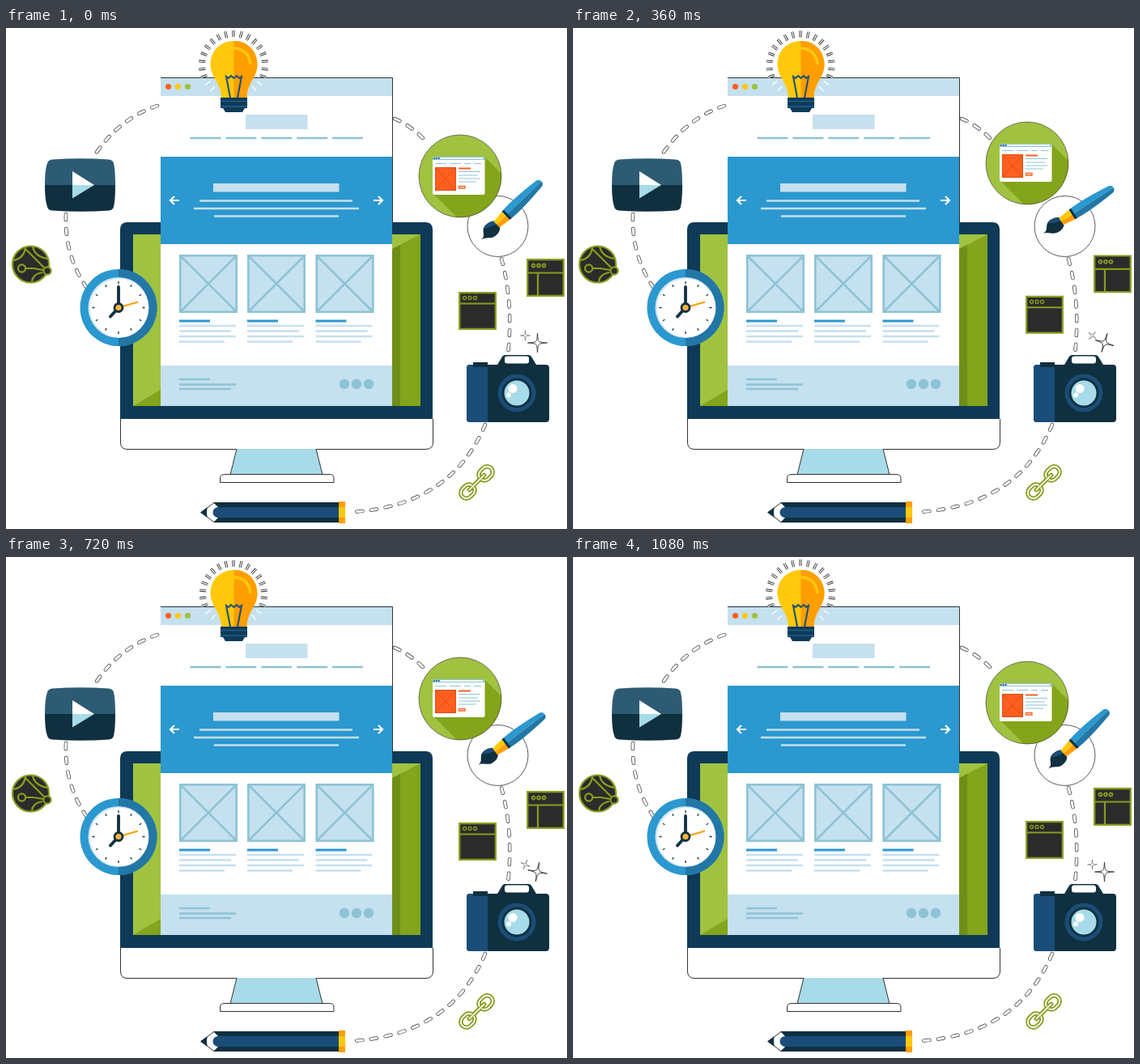
An HTML page for the animation above (1100 ms loop, 693 by 619 pixels).

```html
<!DOCTYPE html>
<html lang="en">
<head>
<meta charset="utf-8">
<title>Web design workspace</title>
<style>
html, body { margin: 0; width: 100%; height: 100%; overflow: hidden; background: #fff; }
svg { display: block; width: 693px; height: 619px; }
.line { fill: none; stroke: #333; }
.pale { fill: #c5e0ee; }
.paleLine { fill: none; stroke: #c5e0ee; stroke-width: 2.6; }
.tealLine { fill: none; stroke: #8cc3d5; stroke-width: 2.6; }
.navy { fill: #10303f; }
.deep { fill: #1a4d78; }
.blue { fill: #2b98cf; }
.sky { fill: #a7dbe9; }
.white { fill: #fff; }
.lime { fill: #a0c240; }
.moss { fill: #84a41b; }
.icon { fill: #2b2b2b; stroke: #869d1f; stroke-width: 2.2; }
.dash { fill: none; stroke-linecap: round; stroke-dasharray: 7 10.8; }
</style>
</head>
<body>
<svg viewBox="0 0 693 619">
<defs>
  <path id="trail" d="M187 96Q137 113 107 161M74 230Q72 280 99 320M480 112Q505 123 522 144M612 285Q627 340 620 403M592 490Q550 590 428 598"/>
  <g id="dots"><circle r="2"/><circle cx="6.5" r="2"/><circle cx="13" r="2"/></g>
  <path id="frame" d="M1.2 1.2H45.8V45.8H1.2Z"/>
  <g id="article">
    <path class="pale" d="M0 280h72v72H0Z"/>
    <path class="tealLine" d="M1.3 281.3H70.7V350.7H1.3ZL70.7 350.7M70.7 281.3L1.3 350.7"/>
    <path d="M0 362H38" stroke="#2b98cf" stroke-width="2.8"/>
    <path class="paleLine" d="M0 368H70M0 374.5H64M0 381H70M0 387.5H56"/>
  </g>
  <path id="star" d="M0-12Q.5-2 2-2Q2-.5 12 0Q2 .5 2 2Q.5 2 0 12Q-.5 2-2 2Q-2 .5-12 0Q-2-.5-2-2Q-.5-2 0-12Z"/>
  <path id="chain" d="M7-2.500A7 7 0 0 1 13-7H18A7 7 0 0 1 18 7H13A7 7 0 0 1 7 2.500M-7-2.500A7 7 0 0 0-13-7H-18A7 7 0 0 0-18 7H-13A7 7 0 0 0-7 2.500M-13 0H13"/>
  <path id="glass" d="M281.5 16C264 16 252.5 29 252.5 45C252.5 61 266 68 266 86H297.5C297.5 68 310.5 61 310.5 45C310.5 29 299 16 281.5 16Z"/>
  <path id="rays"/>
  <clipPath id="rightGlass"><path d="M281.5 0h40v100h-40Z"/></clipPath>
  <clipPath id="badge"><circle r="51"/></clipPath>
</defs>

<use href="#trail" class="dash" stroke="#333" stroke-width="4.4"/>
<use href="#trail" class="dash" stroke="#fff" stroke-width="3"/>

<!-- monitor -->
<path fill="#0f3a57" d="M141 483V249Q141 240 150 240H518Q527 240 527 249V483Z"/>
<path class="lime" d="M157 255H512V467H157Z"/>
<path class="moss" d="M157 467L191 447V467ZM477 273L512 255V467H477Z"/>
<path fill="#6f8e18" d="M477 273L487 268V467H477Z"/>
<path class="line" d="M141.5 483V512Q141.5 520.5 150 520.5H518Q527.5 520.5 527.5 512V483"/>
<path class="sky" d="M285 520H383L391 552H277Z"/>
<path class="line" d="M285 520L277 552M383 520L391 552M264.5 561.5V556Q265 551.5 270 551.5H399Q405 551.5 405 556V561.5Z"/>

<use href="#rays" stroke="#222" stroke-width="3"/>

<!-- web page -->
<path class="white" d="M191 62H477V467H191Z"/>
<path class="line" d="M191 61.5H477.5V240"/>
<path class="pale" d="M191 62H477V84H191ZM296 107H372.5V125H296ZM191 417H477V467H191Z"/>
<circle cx="200.5" cy="72.5" r="3.6" fill="#ff5f1f"/>
<circle cx="212.5" cy="72.5" r="3.6" fill="#ffc80b"/>
<circle cx="224.5" cy="72.5" r="3.6" class="lime"/>
<path class="tealLine" d="M227.5 136H441" stroke-dasharray="38 5.9"/>
<path class="blue" d="M191 159H477V267H191Z"/>
<path class="pale" d="M256 192H411.5V202.5H256Z"/>
<path class="paleLine" d="M239 213.5H428M232 223H436M257 232.5H411"/>
<path d="M214 213H204M208 208L203 213L208 218M454 213H464M460 208L465 213L460 218" fill="none" stroke="#fff" stroke-width="2.2"/>
<use href="#article" x="214"/><use href="#article" x="298"/><use href="#article" x="382.5"/>
<path class="tealLine" d="M214 434H252M214 440.5H284M214 446H278"/>
<g fill="#8cc3d5"><circle cx="418" cy="440" r="6.2"/><circle cx="433" cy="440" r="6.2"/><circle cx="448" cy="440" r="6.2"/></g>

<!-- light bulb -->
<use href="#rays" stroke="#fff" stroke-width="1.3"/>
<use href="#glass" fill="#ffc80b"/>
<use href="#glass" fill="#ff9e00" clip-path="url(#rightGlass)"/>
<path d="M281.5 25Q300 26 302 45" fill="none" stroke="#ffc80b" stroke-width="3.5"/>
<path d="M277 86L272 60L275 62L278 59L281.5 62L285 59L288 62L291 60L286 86" fill="none" stroke="#1a4d78" stroke-width="2"/>
<path fill="#0f3a57" d="M265 86H298V99H295L292 104H271L268 99H265Z"/>
<path d="M265 90.5H298M265 97H298" stroke="#1f5f8b" stroke-width="1.5"/>

<!-- video -->
<path fill="#2d5b74" d="M48 194Q48 175 51 167Q52 163 57 162.5Q92 160 127 162.5Q132 163 133 167Q135 175 135 194Z"/>
<path class="navy" d="M48 194Q48 213 51 221Q52 225 57 225.5Q92 228 127 225.5Q132 225 133 221Q135 213 135 194Z"/>
<path class="white" d="M82 177L109 194H82Z"/><path class="sky" d="M82 194H109L82 210.5Z"/>

<!-- clock -->
<circle cx="139" cy="345.5" r="47.5" class="blue"/>
<path fill="#2277a6" d="M139 298A47.5 47.5 0 0 1 139 393Z"/>
<circle cx="139" cy="345.5" r="37.5" fill="#d5e9f4"/><circle cx="140" cy="346" r="36" class="white"/>
<path id="ticks" stroke="#10303f" stroke-width="1.3"/>
<path d="M139 345.5V320M139 345.5L129 356.5" stroke="#10303f" stroke-width="3.8" stroke-linecap="round"/>
<path d="M139 345.5L163 338.5" stroke="#ff9e00" stroke-width="2"/>
<circle cx="139" cy="345.5" r="5" fill="#ffb33c" stroke="#10303f" stroke-width="2.8"/>

<!-- globe -->
<g class="icon">
  <circle cx="30.5" cy="292" r="22.5"/>
  <path fill="none" d="M9 287Q22 285 24 271M24 273L47 296M33 270Q35 282 51 285M24 297H34L46 299M32 313Q33 304 45 302"/>
  <circle cx="19.5" cy="297" r="4.6"/><circle cx="51" cy="300" r="4.6"/>
</g>

<!-- camera -->
<path class="navy" d="M607 416L613 406Q614 404 617 404H645Q648 404 649 406L655 416H667Q671 416 671 420V483Q671 487 667 487H573Q569 487 569 483V420Q569 416 573 416Z"/>
<path class="deep" d="M595 416V487H573Q569 487 569 483V420Q569 416 573 416H577V413H595Z"/>
<path class="navy" d="M577 413H595V419H577Z"/>
<rect class="white" x="616" y="405.5" width="30" height="9" rx="3"/>
<circle cx="631" cy="451" r="23.5" class="deep"/><circle cx="631" cy="451" r="18.5" class="navy"/>
<circle cx="631" cy="451" r="15.5" class="sky"/>
<circle cx="626" cy="445.5" r="5.5" class="white"/><circle cx="621" cy="453.5" r="3" class="white"/>

<!-- chain link -->
<g transform="translate(581.5 561.5) rotate(-45)" fill="none" stroke-linecap="round">
  <use href="#chain" stroke="#869d1f" stroke-width="5.4"/>
  <use href="#chain" stroke="#fff" stroke-width="1.8"/>
</g>

<!-- pencil -->
<path class="white" stroke="#333" d="M241 598.5L257 586.5H265V610.5H257Z"/>
<path class="navy" d="M240 598.5L249 592Q247 598 249 605ZM256 586H411V611H256L262 605Q255 598 262 592Z"/>
<path class="deep" d="M411 592H262A6.5 6.5 0 0 0 262 605H411Z"/>
<path fill="#ff9e00" d="M411 585H419V612H411Z"/><path fill="#ffc80b" d="M411 592H419V605H411Z"/>

<!-- moving icons -->
<g id="single" class="icon"><use href="#frame"/><path d="M1 14.5H46"/><use href="#dots" x="7.5" y="7.5" stroke-width="1.3"/></g>
<g id="split" class="icon"><use href="#frame"/><path d="M1 17.5H46M14 17.500V46"/><use href="#dots" x="8.500" y="8.500" stroke-width="1.8"/></g>
<g class="line" stroke-width=".9"><use id="bigStar" href="#star"/><use id="smallStar" href="#star"/></g>
<circle class="white" stroke="#333" stroke-width=".8" cx="607.5" cy="245" r="37.5"/>

<g id="round">
  <circle r="51" class="lime"/>
  <path class="moss" clip-path="url(#badge)" d="M31-23L70 16V70H15L-34 21Z"/>
  <circle class="line" r="51" stroke-width=".6"/>
  <rect class="white" x="-34" y="-24" width="64.5" height="47" rx="2"/>
  <path fill="#8cc3d5" d="M-34-20V-22Q-34-24-32-24H28Q30.5-24 30.5-22V-20Z"/>
  <path class="white" d="M-25-23H28V-21H-25Z"/>
  <path d="M-33-22H-25" stroke="#1a4d78" stroke-width="1.5" stroke-dasharray="1.5 1.5"/>
  <path d="M-31-15.5H-17M-13-15.5H1M5-15.5H13M17-15.5H26M-2-5.5H25M-2-1H22M-2 3H25M-2 7H20" stroke="#8cc3d5" stroke-width="1.1"/>
  <path fill="#ff5f1f" d="M-31-11H-5V18H-31Z"/>
  <path d="M-30.5-10.5H-5.5V17.5H-30.5ZL-5.5 17.5M-5.5-10.5L-30.5 17.5" fill="none" stroke="#d94b12" stroke-width=".8"/>
  <path d="M-2-9.5H13" stroke="#ff5f1f" stroke-width="2"/>
  <path d="M-1.5 12.5H6V15H-1.5Z" fill="none" stroke="#ff5f1f" stroke-width="1.3"/>
</g>

<g id="brush">
  <path class="navy" d="M-52 0C-43 2-45-9-35-9Q-28-9-24-5V5Q-28 10-36 9C-43 8-44 2-52 0Z"/>
  <path class="deep" d="M-40-7Q-33-11-24-5V0Q-33-3-40-7Z"/>
  <path fill="#ffc80b" d="M-25-5L-9-7V0H-25Z"/><path fill="#ff9e00" d="M-25 0H-9V7L-25 5Z"/>
  <path class="blue" d="M-9-7Q10-9 48-5Q52-4 52 0H-9Z"/><path fill="#2277a6" d="M-9 0H52Q52 4 48 5Q10 9-9 7Z"/>
  <path class="navy" d="M-9-7H-6V7H-9Z"/>
</g>
</svg>
<script>
const LOOP = 1100, STEP = 20, HOLD = 120;
const times = [0, 100, 260, 460, 620, 720, 920, 1080];
const tracks = {
  round:  [183, 183, 170, 165.7, 172, 175, 179, 180],
  single: [326, 326, 335, 326, 325, 328, 329, 326],
  split:  [285, 285, 280, 281, 286, 289, 287, 285],
  swing:  [0, 0, .57, 1, .73, .53, .2, 0],
  inner:  [35, 35, 35, 34, 40.5, 34, 35, 35],
  outer:  [43, 43, 43, 42, 42, 42, 43, 43]
};
const $ = id => document.getElementById(id);
const place = (id, value) => $(id).setAttribute('transform', value);

const slope = (keys, i) => (keys[i + 1] - keys[i]) / (times[i + 1] - times[i]);

// Harmonic-mean tangents keep the curve from overshooting its keys.
function tangent(keys, i) {
  if (i === 0 || i === times.length - 1) return 0;
  const a = slope(keys, i - 1), b = slope(keys, i);
  return a * b <= 0 ? 0 : 2 * a * b / (a + b);
}

function sample(keys, t) {
  let i = 0;
  while (i < times.length - 2 && t >= times[i + 1]) i++;
  const span = times[i + 1] - times[i], u = (t - times[i]) / span, v = 1 - u;
  return keys[i] * v * v * (1 + 2 * u) + keys[i + 1] * u * u * (3 - 2 * u)
    + span * u * v * (v * tangent(keys, i) - u * tangent(keys, i + 1));
}

// Short strokes pointing away from a centre, spread evenly around it.
function spokes(cx, cy, count, first, last, from, to) {
  let d = '';
  for (let i = first; i <= last; i++) {
    const angle = i * 2 * Math.PI / count, x = Math.sin(angle), y = -Math.cos(angle);
    d += `M${cx + x * from} ${cy + y * from}L${cx + x * to} ${cy + y * to}`;
  }
  return d;
}

function draw(now) {
  let t = Math.floor(now % LOOP / STEP) * STEP;
  if (t < HOLD) t = 0;
  const at = name => sample(tracks[name], t);
  const swing = at('swing');
  place('round', `translate(561 ${at('round')})`);
  place('single', `translate(559 ${at('single')})`);
  place('split', `translate(643 ${at('split')})`);
  place('brush', `translate(624 225.5) rotate(${-44 + 13 * swing})`);
  place('bigStar', `translate(656.5 389) rotate(${20 * swing})`);
  place('smallStar', `translate(641.5 380) rotate(${45 * swing}) scale(.5)`);
  $('rays').setAttribute('d', spokes(281, 46, 26, -10, 10, at('inner'), at('outer')));
}

$('ticks').setAttribute('d', spokes(139, 345.5, 12, 0, 11, 29.5, 32.5));

const start = performance.now();
function tick() {
  draw(performance.now() - start);
  requestAnimationFrame(tick);
}
tick();
</script>
</body>
</html>
```
